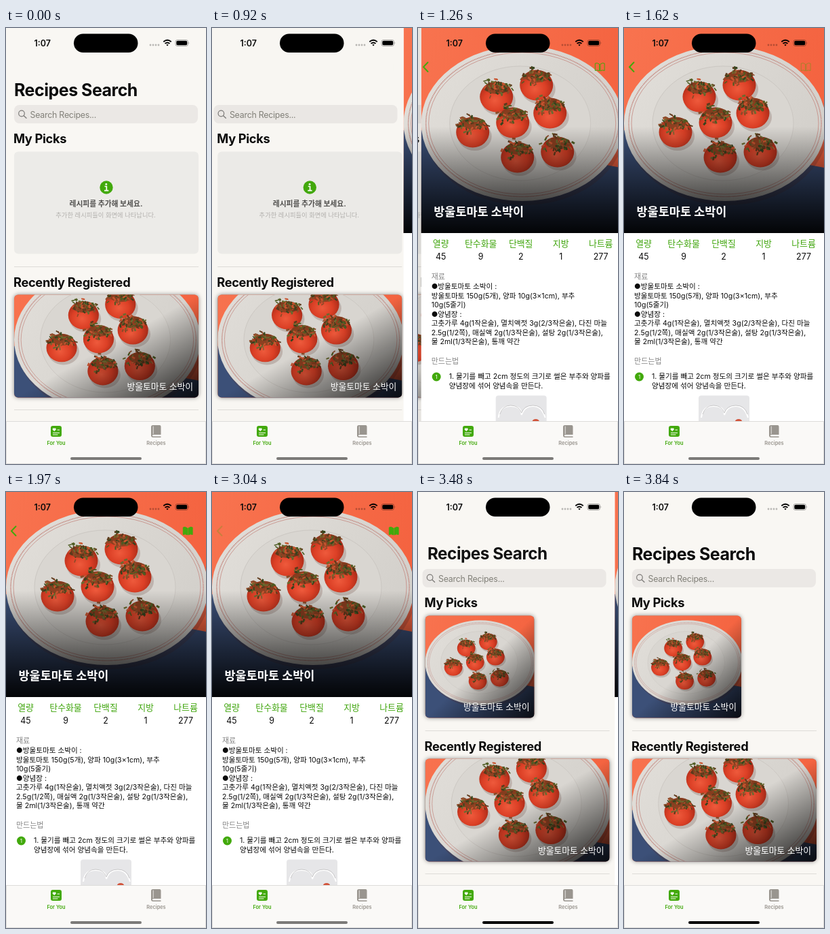
An HTML page for the animation above (4900 ms loop, 295x640 px).

```html
<!DOCTYPE html>
<html lang="ko">
<head>
<meta charset="utf-8">
<title>Recipes Search</title>
<style>
html, body { margin: 0; width: 100%; height: 100%; overflow: hidden; background: #f9f7f3; }
svg { display: block; }
text { font-family: Inter, "Noto Sans CJK KR", "Noto Sans CJK", sans-serif; fill: #0b0b0b; white-space: pre; }
.mid { text-anchor: middle; }
.h1 { font-size: 25px; font-weight: 700; letter-spacing: -.5px; }
.h2 { font-size: 18.3px; font-weight: 700; letter-spacing: -.36px; }
.cap { font-size: 12.8px; font-weight: 500; fill: #fff; text-anchor: end; }
.tab { font-size: 7.4px; font-weight: 600; text-anchor: middle; }
.body text { font-size: 10.6px; }
.body .label { font-size: 11px; fill: #858585; }
.facts text { text-anchor: middle; font-size: 12.4px; }
.facts .name { font-size: 12.9px; font-weight: 500; fill: #3fa50c; }
.shadow { filter: drop-shadow(0 0 3px rgba(0, 0, 0, .45)); }
</style>
</head>
<body>
<svg width="295" height="640" viewBox="0 0 295 640">
  <defs>
    <radialGradient id="red" cx=".45" cy=".62" r=".6">
      <stop offset="0" stop-color="#ee5a3c"/><stop offset=".55" stop-color="#dc4026"/><stop offset="1" stop-color="#a92a17"/>
    </radialGradient>
    <linearGradient id="dish" x1="0" y1="0" x2="1" y2=".5">
      <stop offset="0" stop-color="#e2dfda"/><stop offset="1" stop-color="#d3d0cb"/>
    </linearGradient>
    <linearGradient id="cloth" x1="0" y1="0" x2="1" y2=".3">
      <stop offset="0" stop-color="#f8734f"/><stop offset="1" stop-color="#f46340"/>
    </linearGradient>
    <linearGradient id="fadeDown" x1="0" y1="0" x2="0" y2="1">
      <stop offset=".48" stop-color="#000" stop-opacity="0"/><stop offset="1" stop-color="#000" stop-opacity=".95"/>
    </linearGradient>
    <linearGradient id="fadeCorner" x1="0" y1="0" x2="1" y2="1">
      <stop offset=".5" stop-color="#000" stop-opacity="0"/><stop offset="1" stop-color="#000" stop-opacity=".85"/>
    </linearGradient>
    <clipPath id="photoBox"><rect width="295" height="301"/></clipPath>
    <clipPath id="pickBox"><rect x="12" y="181.500" width="161" height="150" rx="6"/></clipPath>
    <clipPath id="recentBox"><rect x="12" y="391.500" width="272" height="151" rx="6"/></clipPath>
    <g id="photo" clip-path="url(#photoBox)">
      <rect width="295" height="301" fill="url(#cloth)"/>
      <path d="M0 150L295 205V301H0Z" fill="#3c5078"/>
      <ellipse cx="152" cy="146" rx="149" ry="114" fill="#5a3030" opacity=".25"/>
      <ellipse cx="149" cy="140" rx="149" ry="114" fill="url(#dish)"/>
      <g fill="none" stroke="#c48a82">
        <ellipse cx="149" cy="140" rx="142" ry="107.500" stroke-width="1.600" stroke-dasharray="1.500 .8"/>
        <ellipse cx="149" cy="140" rx="138" ry="104" stroke-width=".8"/>
      </g>
      <ellipse cx="146" cy="140" rx="104" ry="84" fill="#d9d6d1" stroke="#cbc7c2"/>
      <g id="tomatoes"></g>
    </g>
  </defs>

  <g id="home">
    <rect x="-5" width="400" height="640" fill="#f9f7f3"/>
    <text class="h2" x="11" y="169">My Picks</text>
    <g id="empty">
      <rect x="12" y="181.500" width="272" height="150" rx="6" fill="#ecebe8"/>
      <circle cx="148" cy="234" r="9.700" fill="#42a90c"/>
      <path d="M145.500 232.500H148.300V238.500M145 238.700H151.300" fill="none" stroke="#fff" stroke-width="1.700"/>
      <circle cx="147.800" cy="229.300" r="1.400" fill="#fff"/>
      <text class="mid" x="147.500" y="262" font-size="10.800" font-weight="700" style="fill:#535250">레시피를 추가해 보세요.</text>
      <text class="mid" x="147" y="278" font-size="9.300" style="fill:#b3b1ae">추가한 레시피들이 화면에 나타납니다.</text>
    </g>
    <g id="pick">
      <rect class="shadow" x="12" y="181.500" width="161" height="150" rx="6" fill="#99938f"/>
      <g clip-path="url(#pickBox)">
        <use href="#photo" transform="translate(12 174) scale(.546)"/>
        <rect x="12" y="181" width="161" height="151" fill="url(#fadeCorner)"/>
      </g>
      <text class="cap" x="166" y="320">방울토마토 소박이</text>
    </g>
    <path d="M12 350.500H284M12 560.500H284" stroke="#dedcd8"/>
    <text class="h2" x="11" y="379.500">Recently Registered</text>
    <rect class="shadow" x="12" y="391.500" width="272" height="151" rx="6" fill="#99938f"/>
    <g clip-path="url(#recentBox)">
      <use href="#photo" transform="translate(12 328.500) scale(.922)"/>
      <rect x="12" y="391" width="272" height="152" fill="url(#fadeCorner)"/>
    </g>
    <text class="cap" x="276" y="531">방울토마토 소박이</text>
  </g>

  <g id="search">
    <rect x="12" y="113" width="271" height="27" rx="7.500" fill="#ebe8e5"/>
    <circle cx="23" cy="125.500" r="4.300" fill="none" stroke="#7d7b79" stroke-width="1.200"/>
    <path d="M26.200 128.700L30 132.300" stroke="#7d7b79" stroke-width="1.300" stroke-linecap="round"/>
    <text x="35.500" y="131.500" font-size="12.400" letter-spacing="-.25" style="fill:#828079">Search Recipes...</text>
  </g>
  <text class="h1" id="title">Recipes Search</text>
  <rect id="dim" width="295" height="640"/>

  <g id="detail">
    <rect width="295" height="640" fill="#fff"/>
    <use href="#photo"/>
    <rect width="295" height="301" fill="url(#fadeDown)"/>
    <text x="18.500" y="275.500" font-size="17.500" font-weight="700" style="fill:#fff">방울토마토 소박이</text>
    <g class="facts" id="facts"></g>
    <g class="body" id="body">
      <text class="label" x="15" y="369">재료</text>
      <text class="label" x="15" y="493">만드는법</text>
      <circle cx="22.500" cy="512" r="6.500" fill="#42a90c"/>
      <text class="mid" x="22.500" y="514.800" style="fill:#fff;font-size:8px">1</text>
      <text x="41" y="515">1. 물기를 빼고 2cm 정도의 크기로 썰은 부추와 양파를</text>
      <text x="41" y="528.500">양념장에 섞어 양념속을 만든다.</text>
    </g>
    <rect x="110" y="539.500" width="75" height="60" rx="4" fill="#e6e6e8"/>
    <path d="M114 572Q116 555 132 555T148 568Q152 555 165 555T183 572" fill="none" stroke="#fff" stroke-width="2"/>
    <path d="M116 567Q120 554 132 554T148 565Q152 554 165 554T182 567" fill="none" stroke="#bcbabb" stroke-width=".8"/>
    <ellipse cx="169" cy="577" rx="5" ry="3" fill="#d2543b"/>
  </g>

  <path id="back" d="M14.500 50.500L8 57.200L14.500 64" fill="none" stroke="#42a90c" stroke-width="2" stroke-linecap="round" stroke-linejoin="round"/>
  <path id="book" d="M267.500 53Q264 50.500 261.300 52V62.500Q264.500 61 267.500 63ZM268.900 53Q272.400 50.500 275.100 52V62.500Q271.900 61 268.900 63Z" stroke="#42a90c" stroke-width="1"/>

  <rect x=".5" y="577.500" width="294" height="62" fill="#faf9f7" stroke="#dddcda"/>
  <rect x="66" y="584" width="16" height="16" rx="3" fill="#42a90c"/>
  <path d="M71.200 592L68.900 589.700A1.400 1.400 0 0 1 71.200 588A1.400 1.400 0 0 1 73.500 589.700Z" fill="#fff"/>
  <path d="M75.500 590H79M69 594.300H79M69 597H76.500" stroke="#fff" stroke-width="1.100"/>
  <text class="tab" x="74" y="611.500" style="fill:#42a90c">For You</text>
  <path d="M216.500 583H226.500Q228.500 583 228.500 585V597H217Q215.800 597.200 215.800 598.300T217 599.500H228.500V601H217Q214 601 214 598V585.500Q214 583 216.500 583Z" fill="#99958f"/>
  <path d="M217.200 584.500V596" stroke="#faf9f7" stroke-width=".8"/>
  <text class="tab" x="221.500" y="611.500" style="fill:#99958f">Recipes</text>
  <rect id="grip" x="95" y="630" width="105" height="4" rx="2"/>

  <text class="mid" x="53.700" y="26.500" font-size="12.500" font-weight="600">1:07</text>
  <rect x="100" y="8.500" width="94.500" height="27.500" rx="13.750"/>
  <g opacity=".25"><circle cx="213" cy="25" r="1.400"/><circle cx="217" cy="25" r="1.400"/><circle cx="221" cy="25" r="1.400"/><circle cx="225" cy="25" r="1.400"/></g>
  <path d="M232.300 20.300Q238 15.300 243.700 20.300M234.500 22.900Q238 19.900 241.500 22.900" fill="none" stroke="#000" stroke-width="1.900"/>
  <path d="M236.300 24.600Q238 23.200 239.700 24.600L238 26.500Z"/>
  <rect x="250" y="17.500" width="18.500" height="9" rx="2.800" fill="none" stroke="#000" stroke-opacity=".4" stroke-width=".8"/>
  <rect x="251.300" y="18.800" width="15.900" height="6.400" rx="1.700"/>
  <path d="M269.600 20.500Q271.200 22 269.600 23.500Z" opacity=".45"/>
</svg>
<script>
const $ = id => document.getElementById(id);
const NS = "http://www.w3.org/2000/svg";

function add(parent, tag, attrs, text) {
  const el = document.createElementNS(NS, tag);
  for (const k in attrs) el.setAttribute(k, attrs[k]);
  if (text) el.textContent = text;
  parent.append(el);
}

let seed = 7;
const rand = () => (seed = seed * 16807 % 2147483647) / 2147483647;

// Tomatoes with a heaped cap of chopped herbs
const herbs = ["#4d5c22", "#6b6a30", "#35431d", "#8d4a28", "#c8542f", "#5c3a1c"];
const spots = [[111, 101], [170, 84], [76, 153], [135, 139], [190, 125], [142, 190], [201, 182]];
const dishUp = $("tomatoes");
for (const [x, y] of spots) {
  add(dishUp, "ellipse", { cx: x + 3, cy: y + 6, rx: 25, ry: 21, fill: "#6d4a40", opacity: .25 });
  add(dishUp, "ellipse", { cx: x, cy: y, rx: 24.5, ry: 22.5, fill: "url(#red)" });
  add(dishUp, "ellipse", { cx: x + 1, cy: y - 13, rx: 18, ry: 9, fill: "#74401f", opacity: .75 });
  for (let i = 0; i < 60; i++) {
    const a = rand() * 2 * Math.PI, r = Math.sqrt(rand()), b = rand() * Math.PI;
    const hx = x + Math.cos(a) * r * 23, hy = y - 13 + Math.sin(a) * r * (12 + 5 * Math.cos(a * 3));
    add(dishUp, "path", {
      d: `M${hx} ${hy}l${Math.cos(b) * 5} ${Math.sin(b) * 5}`,
      stroke: herbs[i % herbs.length], "stroke-width": 1.4 + rand() * 1.6
    });
  }
}

[["열량", 45], ["탄수화물", 9], ["단백질", 2], ["지방", 1], ["나트륨", 277]].forEach(([name, n], i) => {
  const x = 29 + i * 59;
  add($("facts"), "text", { class: "name", x, y: 320.5 }, name);
  add($("facts"), "text", { x, y: 340 }, String(n));
});

["●방울토마토 소박이 :", "방울토마토 150g(5개), 양파 10g(3×1cm), 부추", "10g(5줄기)", "●양념장 :",
 "고춧가루 4g(1작은술), 멸치액젓 3g(2/3작은술), 다진 마늘",
 "2.5g(1/2쪽), 매실액 2g(1/3작은술), 설탕 2g(1/3작은술),", "물 2ml(1/3작은술), 통깨 약간"]
  .forEach((line, i) => add($("body"), "text", { x: 15, y: 383 + i * 13.5 }, line));

const LOOP = 4900, W = 295;
const steps = [0, 920, 1030, 1140, 1260, 1370, 1620, 1840, 1970, 3040, 3140, 3250, 3370, 3480, 3590, 3840];

// Critically damped spring from 0 to 1
function spring(t, start) {
  const k = Math.max(0, 17 * (t - start) / 1000);
  return 1 - (1 + k) * Math.exp(-k);
}
const clamp = v => Math.min(1, Math.max(0, v));
const set = (id, k, v) => $(id).setAttribute(k, v);
const move = (id, x) => set(id, "transform", `translate(${x.toFixed(2)} 0)`);

function draw(time) {
  const t = steps.findLast(s => s <= time);
  const push = spring(t, 901), pop = spring(t, 3122);
  const open = push - pop, leaving = pop > 0;
  const width = W * open;

  move("detail", W - width);
  move("home", -.3 * width);
  move("search", -width * (leaving ? 1.14 : .77));
  set("dim", "opacity", .08 * open);

  // Title grows back from the small back label
  const u = push === 0 ? 1 : clamp((pop - .63) / .37);
  const size = .35 + .65 * u;
  set("title", "transform", `translate(${57 - 45 * u} ${82 + 18 * u}) scale(${size})`);
  set("title", "opacity", push === 0 ? 1 : leaving ? .25 + .75 * u : 0);

  const swap = clamp((t - 3140) / 250);
  set("pick", "opacity", swap);
  set("empty", "opacity", 1 - swap);

  const press = t === 1620 ? .4 : t === 1840 ? .65 : 1;
  set("book", "fill", t >= 1840 ? "#42a90c" : "none");
  set("book", "opacity", clamp(open * 1.3 - .05) * press);
  set("back", "opacity", open * open * (t >= 3040 ? .25 : 1));
  set("grip", "fill", leaving ? "#000" : "#7b7a78");
}

const begin = performance.now();
function tick() {
  draw((performance.now() - begin) % LOOP);
  requestAnimationFrame(tick);
}
tick();
</script>
</body>
</html>
```
